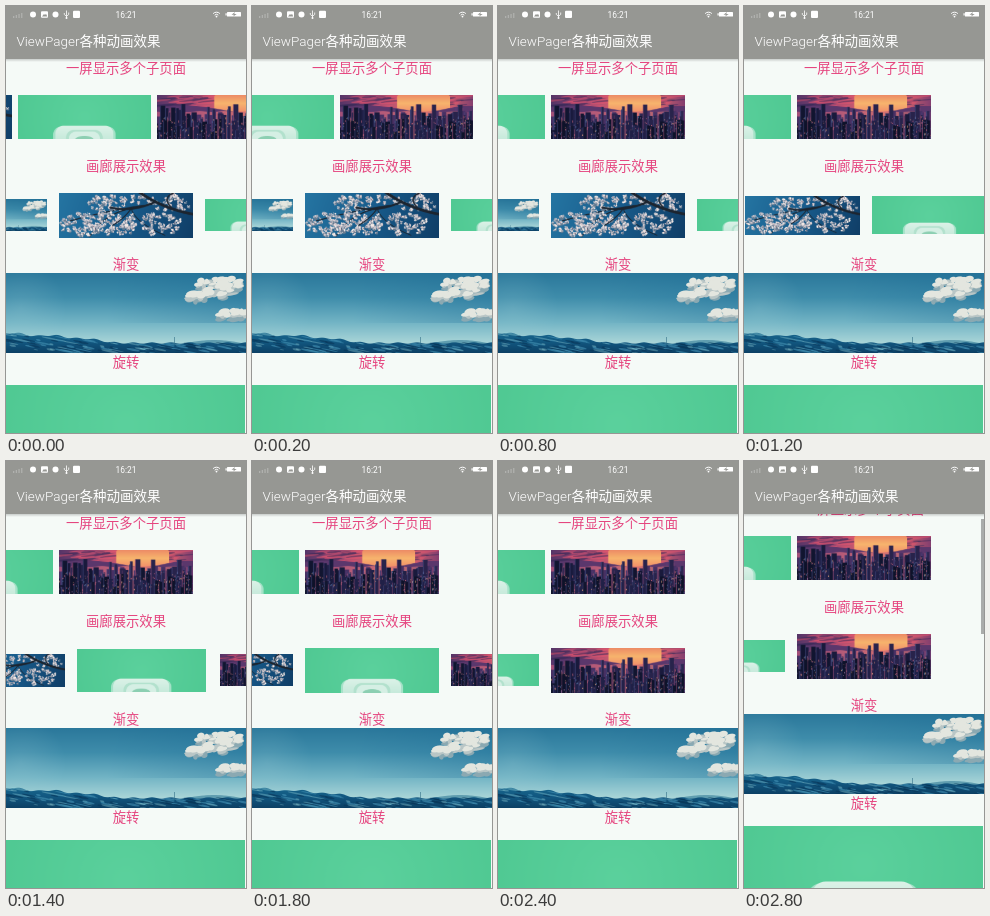
Write an HTML page with a canvas that moves like this. It is 240 px wide and 427 px high and loops after 3 s.

```html
<!DOCTYPE html>
<html lang="zh">
<head>
<meta charset="utf-8">
<style>
html, body { margin: 0; width: 100%; height: 100%; overflow: hidden; background: #f5faf7; }
canvas { display: block; width: 240px; height: 427px; }
</style>
</head>
<body>
<canvas id="stage"></canvas>
<script>
const W = 240, H = 427, LOOP = 3000, STEP = 200;
const FONT = 'Roboto, "Noto Sans CJK SC", "Noto Sans CJK", sans-serif';
const GRAY = '#969793';
const stage = document.getElementById('stage');
const dpr = window.devicePixelRatio || 1;
stage.width = W * dpr;
stage.height = H * dpr;
const c = stage.getContext('2d');
c.scale(dpr, dpr);
c.imageSmoothingQuality = 'high';

function seeded(seed) {
  return () => (seed = (seed * 16807) % 2147483647) / 2147483647;
}

// Each picture is painted once in a 240 x 80 space.
function picture(paint) {
  const cv = document.createElement('canvas');
  cv.width = 480;
  cv.height = 160;
  const g = cv.getContext('2d');
  g.scale(2, 2);
  paint(g);
  return cv;
}

function fade(g, x0, y0, x1, y1, ...colors) {
  const f = g.createLinearGradient(x0, y0, x1, y1);
  colors.forEach((col, i) => f.addColorStop(i / (colors.length - 1), col));
  return f;
}

function glow(g, x, y, r, rgb, alpha) {
  const f = g.createRadialGradient(x, y, 0, x, y, r);
  f.addColorStop(0, `rgba(${rgb},${alpha})`);
  f.addColorStop(1, `rgba(${rgb},0)`);
  g.fillStyle = f;
  g.fillRect(x - r, y - r, 2 * r, 2 * r);
}

function oval(g, x, y, rx, ry, col, turn = 0) {
  g.fillStyle = col;
  g.beginPath();
  g.ellipse(x, y, rx, ry, turn, 0, 7);
  g.fill();
}

function box(g, x, y, w, h, r, col) {
  g.fillStyle = col;
  g.beginPath();
  g.roundRect(x, y, w, h, r);
  g.fill();
}

function shape(g, col, ...pts) {
  g.fillStyle = col;
  g.beginPath();
  pts.forEach(p => g.lineTo(...p));
  g.fill();
}

function ridge(g, top, col) {
  g.fillStyle = col;
  g.beginPath();
  g.moveTo(0, 80);
  for (let x = 0; x <= 240; x += 2) g.lineTo(x, top(x));
  g.lineTo(240, 80);
  g.fill();
}

const bump = (x, at, wide) => Math.exp(-(((x - at) / wide) ** 2));

const sea = picture(g => {
  const rnd = seeded(71);
  g.fillStyle = fade(g, 0, 0, 0, 74, '#2b789b', '#3f8dab', '#72b4c5', '#b4dcdc');
  g.fillRect(0, 0, 240, 80);
  glow(g, 15, 36, 45, '165,210,215', .2);
  g.fillStyle = fade(g, 100, 0, 240, 0, 'rgba(20,100,145,0)', 'rgba(20,100,145,.3)');
  g.fillRect(0, 0, 240, 50);

  // Clouds: shaded puffs first, lit puffs above them.
  const cloud = (n, x, y, rx, ry) => {
    for (const [dy, col] of [[2, '#8ba9b2'], [0, '#b9c6c6'], [-2.5, '#e3e6df']]) {
      for (let i = 0; i < n; i++) {
        const a = rnd() * 6.28, d = Math.sqrt(rnd());
        oval(g, x + Math.cos(a) * d * rx, y + dy + Math.sin(a) * d * ry, 2 + rnd() * 4, 1.2 + rnd() * 2, col, -.2);
      }
    }
  };
  cloud(38, 215, 15, 25, 9);
  cloud(10, 191, 24, 11, 3);
  cloud(12, 226, 42, 16, 3);

  ridge(g, x => x < 175 ? 80 : 71 - 4 * Math.sin((x - 175) / 21), '#5f9daf');
  const wave = x => 70 - 10 * bump(x, 6, 25) - 7 * bump(x, 48, 20) - 4 * bump(x, 82, 18) + Math.sin(x / 3) * .7;
  ridge(g, wave, fade(g, 0, 57, 0, 80, '#19698f', '#125881', '#0c4065'));
  for (let i = 0; i < 130; i++) {
    const x = rnd() * 240, y = wave(x) + 1 + rnd() * 14;
    oval(g, x, y, 2 + rnd() * 8, .4 + rnd() * .8, ['rgba(8,54,88,.6)', 'rgba(68,147,181,.6)', 'rgba(151,211,218,.35)'][i % 3], .2);
  }
  box(g, 168, 64, .7, 6, 0, '#437d92');
});

const blossom = picture(g => {
  const rnd = seeded(913);
  g.fillStyle = fade(g, 0, 0, 240, 80, '#2575a2', '#185b8b', '#103e67');
  g.fillRect(0, 0, 240, 80);
  g.lineCap = 'round';
  const branch = (w, x0, y0, x1, y1, x2, y2) => {
    g.strokeStyle = '#1c2530';
    g.lineWidth = w;
    g.beginPath();
    g.moveTo(x0, y0);
    g.quadraticCurveTo(x1, y1, x2, y2);
    g.stroke();
  };
  const cluster = (n, x, y, rx, ry) => {
    for (let i = 0; i < n; i++) {
      const a = rnd() * 6.28, d = Math.sqrt(rnd());
      const fx = x + Math.cos(a) * d * rx, fy = y + Math.sin(a) * d * ry, r = 1.7 + rnd() * 2.3;
      oval(g, fx + 1, fy + 1.5, r, r * .8, '#647b91');
      for (let k = 0; k < 4; k++) {
        oval(g, fx + (rnd() - .5) * r * 2, fy + (rnd() - .5) * r * 2, r * .6, r * .45,
          ['#f4eae7', '#d8cdd1', '#aaaebb'][Math.floor(rnd() * 3)], rnd() * 3);
      }
      if (i % 4 === 0) oval(g, fx, fy, .8, .8, '#724d60');
    }
  };
  branch(2, 170, 20, 100, 28, 20, 50);
  branch(2, 120, 30, 80, 40, 55, 78);
  branch(1.5, 130, 30, 140, 55, 190, 76);
  cluster(65, 40, 55, 38, 22);
  cluster(62, 103, 54, 43, 22);
  cluster(42, 88, 18, 38, 15);
  cluster(45, 180, 55, 40, 20);
  cluster(25, 203, 17, 36, 16);
  cluster(12, 148, 12, 23, 10);
  branch(5, 240, 38, 185, 28, 142, -3);
  branch(3.5, 170, 17, 130, 35, 92, 26);
  branch(2.5, 205, 29, 180, 8, 210, -2);
  branch(2, 130, 27, 118, 45, 96, 58);
});

const mint = picture(g => {
  g.fillStyle = '#50c993';
  g.fillRect(0, 0, 240, 80);
  glow(g, 120, 40, 125, '104,218,168', .45);
  box(g, 64, 57, 112, 40, 14, '#a5e2c8');
  box(g, 68, 55.5, 104, 40, 14, fade(g, 0, 55, 0, 80, '#dcf2e8', '#c7eadb'));
  box(g, 87, 63, 66, 34, 14, '#b2e1cd');
  box(g, 92, 66, 56, 30, 13, '#d5efe4');
  oval(g, 120, 81, 17, 7, '#8ccfb2');
});

const city = picture(g => {
  const rnd = seeded(437);
  g.fillStyle = fade(g, 0, 0, 240, 0, '#553568', '#96456f', '#d9606f', '#e56c68', '#853f70');
  g.fillRect(0, 0, 240, 80);
  for (let i = 0; i < 65; i++) {
    oval(g, rnd() * 240, rnd() * 24, 7 + rnd() * 20, .6 + rnd() * 1.6,
      i % 2 ? 'rgba(228,85,112,.55)' : 'rgba(58,42,91,.6)', -.1);
  }
  box(g, 103, 0, 95, 30, 3, fade(g, 0, 0, 0, 30, '#ed8b66', '#f7b46d', '#f2916a'));
  ridge(g, x => 23 - 4 * Math.sin(x / 31) + 4 * bump(x, 155, 35), '#5b376c');
  ridge(g, x => 30 + Math.sin(x / 7), fade(g, 0, 0, 240, 0, '#a34f78', '#b65b78', '#d87471', '#6d3c71'));
  const row = (n, base, tall, cols) => {
    for (let i = 0; i < n; i++) {
      const x = i / n * 244 - 4, w = 4 + rnd() * 7, y = base - rnd() * tall;
      g.fillStyle = cols[Math.floor(rnd() * cols.length)];
      g.fillRect(x, y, w, 80 - y);
      g.fillStyle = i % 3 ? 'rgba(76,83,139,.65)' : 'rgba(176,88,126,.65)';
      g.fillRect(x, y, 1.2, 80 - y);
      if (rnd() < .2) g.fillRect(x + w / 2, y - 6, .8, 6);
    }
  };
  row(30, 41, 15, ['#483064', '#2d2752', '#202047']);
  row(26, 52, 38, ['#191a3c', '#111530', '#28234b']);
  row(32, 70, 27, ['#12162f', '#202047', '#0e122a']);
  for (let i = 0; i < 260; i++) {
    g.fillStyle = ['#d56d80', '#9770a5', '#5779a7', '#eaa57b'][Math.floor(rnd() * 4)];
    g.globalAlpha = .3 + rnd() * .6;
    g.fillRect(rnd() * 240, 38 + rnd() * 42, 1.4, 1 + rnd() * 3);
  }
  g.globalAlpha = 1;
});

const pages = [sea, blossom, mint, city];

// Pager positions, in pages, at each screen refresh.
const stripAt = [2.297, 2.75, 2.97];
const galleryAt = [1, 1, 1, 1, 1, 1, 1.484, 1.88, 1.99, 2, 2.823, 2.98];

function label(text, y) {
  c.fillStyle = '#e5457f';
  c.font = '13.33px ' + FONT;
  c.textAlign = 'center';
  c.textBaseline = 'alphabetic';
  c.fillText(text, 120, y);
}

function strip(pos) {
  pages.forEach((img, i) => c.drawImage(img, 53 + (i - pos) * 139.4, 89, 133.6, 44.3));
}

function gallery(pos) {
  pages.forEach((img, i) => {
    const d = i - pos, s = 1 - .28 * Math.min(1, Math.abs(d));
    const w = 133.8 * s, h = 44.5 * s;
    c.drawImage(img, 120 + d * 127 - w / 2, 209.3 - h / 2, w, h);
  });
}

function statusBar() {
  for (let i = 0; i < 4; i++) box(c, 7 + i * 2.7, 10 - i, 1.3, 2 + i, 0, 'rgba(255,255,255,.25)');
  oval(c, 27, 8.5, 3, 3, '#fff');
  box(c, 35, 5.3, 7, 6.4, 1, '#fff');
  shape(c, GRAY, [36, 10.5], [38, 8], [39, 9], [40, 7.7], [41.3, 10.5]);
  oval(c, 49.5, 8.5, 3, 3, '#fff');
  c.strokeStyle = '#fff';
  c.lineWidth = .8;
  c.beginPath();
  c.moveTo(60.5, 4.5);
  c.lineTo(60.5, 12);
  c.moveTo(58.3, 7);
  c.lineTo(58.3, 8.5);
  c.lineTo(60.5, 10.3);
  c.lineTo(62.7, 8.5);
  c.lineTo(62.7, 6.5);
  c.stroke();
  oval(c, 60.5, 12, 1, 1, '#fff');
  box(c, 67, 4.8, 7, 7.2, 1, '#fff');
  c.lineWidth = 1;
  for (const r of [2.6, 4.8]) {
    c.beginPath();
    c.arc(210.5, 11, r, -2.35, -.8);
    c.stroke();
  }
  oval(c, 210.5, 10.6, .9, .9, '#fff');
  box(c, 219.5, 7.2, 1.2, 2.2, 0, '#fff');
  box(c, 221, 6, 14, 4.6, .6, '#fff');
  shape(c, GRAY, [229, 6], [225.5, 8.7], [228, 8.7], [227.2, 10.6], [230.7, 7.9], [228.3, 7.9]);
  c.fillStyle = '#fff';
  c.font = '8.4px ' + FONT;
  c.textAlign = 'center';
  c.fillText('16:21', 120, 11.8);
}

function header() {
  c.fillStyle = fade(c, 0, 53, 0, 56, 'rgba(0,0,0,.18)', 'rgba(0,0,0,0)');
  c.fillRect(0, 53, W, 3);
  c.fillStyle = GRAY;
  c.fillRect(0, 0, W, 53);
  statusBar();
  c.fillStyle = '#fff';
  c.font = '300 13.5px ' + FONT;
  c.textAlign = 'left';
  c.fillText('ViewPager各种动画效果', 10.5, 39.7);
}

function draw(t) {
  const n = Math.floor(t / STEP);
  const scroll = n >= 14 ? 14 : 0;
  c.fillStyle = '#f5faf7';
  c.fillRect(0, 0, W, H);
  c.save();
  c.translate(0, -scroll);
  label('一屏显示多个子页面', 67);
  strip(stripAt[n] ?? 3);
  label('画廊展示效果', 165);
  gallery(galleryAt[n] ?? 3);
  label('渐变', 263);
  c.drawImage(sea, 0, 267, 240, 80);
  label('旋转', 361);
  c.drawImage(mint, 0, 379, 239, 80);
  c.restore();
  if (scroll) box(c, 237, 58, 3, 115, 0, 'rgba(120,120,120,.6)');
  header();
}

const start = performance.now();
function tick() {
  draw((performance.now() - start) % LOOP);
  requestAnimationFrame(tick);
}
tick();
</script>
</body>
</html>
```
